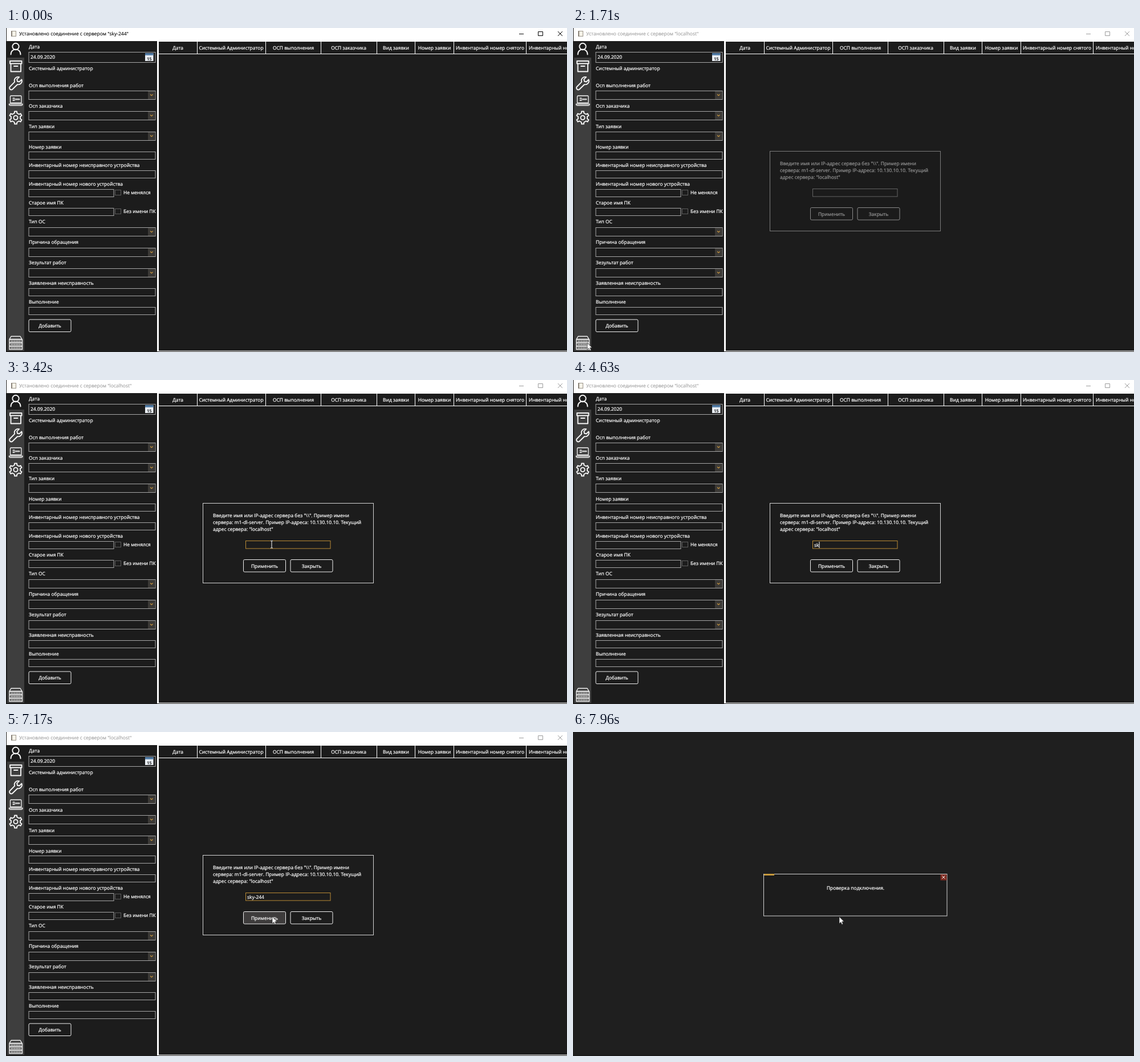
Animation, 984 px wide and 569 px high, one loop 8000 ms. Source, as an HTML page:

```html
<!DOCTYPE html>
<html lang="ru">
<head>
<meta charset="utf-8">
<title>Соединение с сервером</title>
<style>
html, body { margin: 0; width: 100%; height: 100%; overflow: hidden; background: #1f1f1f; }
svg { display: block; }
text {
  font: 8.45px "Open Sans", "Noto Sans", sans-serif;
  fill: #fff; stroke: #fff; stroke-width: .22px; text-rendering: geometricPrecision; white-space: pre;
}
.mid { text-anchor: middle; }
.line { fill: none; stroke: #fff; }
.field { fill: #1c1c1c; stroke: #a6a6a6; }
.icon { fill: none; stroke: #f5f5f5; stroke-width: 1.9; stroke-linejoin: round; stroke-linecap: round; }
.title text { fill: currentColor; stroke: currentColor; stroke-width: .12px; }
.title path { fill: none; stroke: currentColor; }
.off { fill: #f1f1f1; stroke: #f1f1f1; }
.dim { fill: #999; stroke: #999; stroke-width: .12px; }
.day { font-size: 7.5px; font-weight: 700; fill: #333; stroke: none; }

/* One loop is 8 s, so 1% is 80 ms */
.step { animation: 8s step-end infinite; }
.flow { animation: 8s linear infinite; }

.title { animation-name: active; }
@keyframes active { 0% { color: #000; } 19.75%, 100% { color: #9c9c9c; } }
.before { animation-name: before; }
@keyframes before { 0% { opacity: 1; } .5%, 100% { opacity: 0; } }
.after { animation-name: after; }
@keyframes after { 0% { opacity: 0; } .5%, 100% { opacity: 1; } }

.ask { animation-name: ask; }
@keyframes ask { 0%, 19.75% { opacity: 0; } 22.875%, 91.24% { opacity: 1; } 91.25%, 100% { opacity: 0; } }
.focus { animation-name: focus; }
@keyframes focus { 0% { stroke: #a6a6a6; } 28.75%, 100% { stroke: #b98a35; } }
.hover { animation-name: hover; }
@keyframes hover { 0% { fill: #1c1c1c; } 88.25%, 100% { fill: #3e3c3c; } }

.typed { animation-name: typed; }
@keyframes typed {
  0% { width: 0; } 47.875% { width: 4.1px; } 57.875% { width: 8.5px; } 61.5% { width: 12.7px; }
  67.25% { width: 15.5px; } 71.875% { width: 20.3px; } 75.5% { width: 25.1px; } 77.125%, 100% { width: 40px; }
}
.caret { animation-name: caretMove, caretBlink; }
@keyframes caretMove {
  0% { transform: none; } 47.875% { transform: translateX(4px); } 57.875% { transform: translateX(8.5px); }
  61.5% { transform: translateX(12.5px); } 67.25% { transform: translateX(15.5px); }
  71.875% { transform: translateX(20px); } 75.5% { transform: translateX(25px); }
  77.125%, 100% { transform: translateX(30px); }
}
@keyframes caretBlink {
  0% { opacity: 0; } 34.875% { opacity: 1; } 42.25% { opacity: 0; } 47.875% { opacity: 1; }
  54.5% { opacity: 0; } 57.875% { opacity: 1; } 84.875%, 100% { opacity: 0; }
}

.check { animation-name: check; }
@keyframes check { 0% { opacity: 0; } 91.25% { opacity: 1; } 93.75%, 100% { opacity: 0; } }
.ring { transform-box: fill-box; transform-origin: center; animation: spin 1s linear infinite; }
@keyframes spin { to { transform: rotate(360deg); } }

.dark { animation-name: dark; }
@keyframes dark { 0% { opacity: 0; } 93.75%, 100% { opacity: 1; } }
.test { animation-name: test; }
@keyframes test { 0%, 96.5% { opacity: 0; } 98.5%, 100% { opacity: 1; } }
.bar { animation-name: bar; }
@keyframes bar { 0%, 96.875% { width: 0; } 99.5%, 100% { width: 18px; } }

.pointer { animation-name: pointer; }
@keyframes pointer {
  0%, .5% { transform: translate(900px, 490px); animation-timing-function: cubic-bezier(.3, .2, .4, 1); }
  10.375%, 25% { transform: translate(25px, 553px); animation-timing-function: ease-in-out; }
  29.75%, 84.875% { transform: translate(466px, 289px); animation-timing-function: ease-in-out; }
  89.125%, 100% { transform: translate(467px, 324.5px); }
}
.arrow { animation-name: arrow; }
@keyframes arrow { 0% { opacity: 0; } .5% { opacity: 1; } 29% { opacity: 0; } 86.75%, 100% { opacity: 1; } }
.beam { animation-name: beam; }
@keyframes beam { 0% { opacity: 0; } 29% { opacity: 1; } 47.875% { opacity: 0; } 84.875% { opacity: 1; } 86.75%, 100% { opacity: 0; } }
</style>
</head>
<body>
<svg id="stage" width="984" height="569"></svg>
<script>
const rect = (x, y, w, h, attrs = '') => `<rect x="${x}" y="${y}" width="${w}" height="${h}" ${attrs}/>`;
const path = (d, attrs = '') => `<path d="${d}" ${attrs}/>`;
const text = (x, y, s, cls = '') => `<text x="${x}" y="${y}" class="${cls}">${s}</text>`;
const group = (cls, ...parts) => `<g class="${cls}">${parts.join('')}</g>`;
const field = (y, h, w = 222) => rect(40, y + .5, w, h, 'class="field"');
const combo = y => field(y, 15) + rect(249, y + 1, 12.5, 14, 'fill="#3b3936"')
  + path(`M253 ${y + 6.5}l2.3 2.2 2.3-2.2`, 'fill="none" stroke="#c9973f" stroke-width="1.1"');
const button = (x, y, label, cls = '') =>
  rect(x + .5, y + .5, 74, 21.5, `rx="2" fill="#1c1c1c" stroke="#f0f0f0" class="${cls}"`)
  + text(x + 37.5, y + 14.5, label, 'mid');

function titleBar() {
  const connected = 'Установлено соединение с сервером ';
  return rect(1, 0, 983, 23, 'fill="#fff"')
    + rect(10.5, 5.5, 7, 9, 'fill="#f5f2e8" stroke="#9b958a"') + rect(9, 5, 1.5, 10, 'fill="#857f75"')
    + group('title step',
      text(23, 13, connected + '"sky-244"', 'before step'),
      text(23, 13, connected + '"localhost"', 'after step'),
      path('M900 10.5h8M933.5 6.5h8v7h-8zM968 6l8 8M976 6l-8 8'));
}

function gearPath(x, y, teeth) {
  const points = [];
  for (let i = 0; i < teeth; i++)
    for (const [shift, r] of [[-.27, 8.3], [-.17, 11.2], [.17, 11.2], [.27, 8.3]]) {
      const a = (i + shift) * 2 * Math.PI / teeth;
      points.push(`${(x + r * Math.sin(a)).toFixed(2)} ${(y - r * Math.cos(a)).toFixed(2)}`);
    }
  return `M${points.join('L')}z`;
}

function sideBar() {
  const rows = [547, 553, 559];
  const rack = 'M9 541.5h16l3 5H6z' + rows.map(y => `M6 ${y}h22.5v5.5h-22.5z`).join('');
  const dots = rows.map(y => `M8.5 ${y + 2.8}h18`).join('');
  return rect(2, 23, 30, 29, 'fill="#1c1c1c"') + rect(2, 52, 30, 515, 'fill="#3e3e3e"')
    + group('icon',
      '<circle cx="17" cy="32.5" r="5.7"/>', path('M8.5 46.5c0-12 17-12 17 0'),
      path('M7 58h20.5v4.5H7zM8.5 62.5v14H26v-14M14 67h6.5'),
      path('M27.5 90.5l-4 4-3.5-.8-.8-3.5 4-4a6.5 6.5 0 0 0-8 8.5L7 103a3 3 0 0 0 4.5 4.5l8.5-8.3a6.5 6.5 0 0 0 7.5-8.7z'),
      path('M7.5 131.5v-11q0-1.5 1.5-1.5h16.5q1.5 0 1.5 1.5v11zM5.5 133.5h23.5v1q0 1.5-2 1.5H7.5q-2 0-2-1.5z', 'stroke-width="1.3"'),
      path('M23.5 124.6h-7.3a2.7 2.7 0 0 0-4.6-.8h2.6v2.9h-2.6a2.7 2.7 0 0 0 4.6-.8h7.3z', 'stroke-width="1"'),
      path(gearPath(17, 157.5, 6)), '<circle cx="17" cy="157.5" r="3.6"/>',
      path(rack, 'stroke-width="1.4"'),
      path(dots, 'stroke-width="2.2" stroke-dasharray="1.6 1.2" stroke-linecap="butt"'));
}

function form() {
  const labels = [
    [33, 'Дата'], [71, 'Системный администратор'], [101, 'Осп выполнения работ'], [137, 'Осп заказчика'],
    [173, 'Тип заявки'], [208.5, 'Номер заявки'], [241, 'Инвентарный номер неисправного устройства'],
    [274, 'Инвентарный номер нового устройства'], [307, 'Старое имя ПК'], [340, 'Тип ОС'],
    [376, 'Причина обращения'], [412, 'Зезультат работ'], [448, 'Заявленная неисправность'], [481, 'Выполнение']
  ];
  const option = (y, label) => rect(191.5, y + .5, 10, 9, 'fill="#1c1c1c" stroke="#5c5c5c"') + text(206, y + 8, label);
  return labels.map(([y, s]) => text(40, y + 3, s)).join('')
    + field(42, 18) + text(43, 53.8, '24.09.2020')
    + rect(244, 44, 14.5, 14, 'fill="#e9eef4"') + rect(244, 44, 14.5, 4, 'fill="#557fa8"')
    + text(251.3, 56.5, '15', 'mid day')
    + [110, 146, 182, 350, 386, 422].map(combo).join('')
    + [217, 250, 457, 490].map(y => field(y, 13)).join('')
    + [283, 316].map(y => field(y, 13, 149)).join('')
    + option(284, 'Не менялся') + option(317, 'Без имени ПК')
    + button(39.5, 511.5, 'Добавить');
}

function table() {
  const heads = [
    [301.5, 'Дата'], [395, 'Системный Администратор'], [504, 'ОСП выполнения'], [601, 'ОСП заказчика'],
    [684, 'Вид заявки'], [751.5, 'Номер заявки'], [849, 'Инвентарный номер снятого']
  ];
  const edges = [335, 455, 552, 650, 717, 785, 912].map(x => `M${x + .5} 24v21`).join('');
  return rect(265, 23, 3, 545, 'fill="#fff"') + rect(268, 566.8, 716, 1.2, 'fill="#fff"')
    + path('M268 23.5h716M268 45.5h716' + edges, 'class="line"')
    + heads.map(([x, s]) => text(x, 38, s, 'mid')).join('')
    + text(917, 38, 'Инвентарный номер нового');
}

const askDialog = group('ask flow',
  rect(345.5, 216.5, 299, 140, 'fill="#1c1c1c" stroke="#d4d4d4"'),
  text(363, 241, 'Введите имя или IP-адрес сервера без "\\\\". Пример имени'),
  text(363, 253.2, 'сервера: m1-dl-server. Пример IP-адреса: 10.130.10.10. Текущий'),
  text(363, 265.3, 'адрес сервера: "localhost"'),
  rect(420.5, 282.5, 148.5, 13.5, 'fill="#1c1c1c" class="focus step"'),
  `<clipPath id="entry">${rect(423, 280, 0, 20, 'class="typed step"')}</clipPath>`,
  `<g clip-path="url(#entry)">${text(423, 292.7, 'sky-244')}</g>`,
  rect(423, 284, 1, 11, 'fill="#fff" class="caret step"'),
  button(416, 315, 'Применить', 'hover step'), button(498.5, 315, 'Закрыть'));

const offButton = (x, label) => rect(x, 292, 73.5, 21, 'rx="1.5" fill="#bdbdbd"')
  + text(x + 36.7, 305.7, label, 'mid off');
const checkDialog = group('check step',
  rect(345.5, 216.5, 299, 116, 'fill="#1c1c1c" stroke="#d4d4d4"'),
  text(495, 241.3, 'Проверка введенных данных. Подождите.', 'mid'),
  rect(420.5, 258.5, 148.5, 13.5, 'fill="#1c1c1c" stroke="#777"'),
  text(423, 268.7, 'sky-244', 'dim'),
  offButton(417, 'Применить'), offButton(499.5, 'Закрыть'),
  '<g class="ring" fill="none" stroke-width="2.2"><circle cx="477" cy="324.3" r="4.8" stroke="#2c6fb0"/>',
  '<circle cx="477" cy="324.3" r="4.8" stroke="#5eb2f2" stroke-dasharray="14 17"/></g>');

const darkScreen = group('dark step',
  rect(0, 0, 984, 569, 'fill="#1f1f1f"'), rect(0, 567.5, 984, 1.5, 'fill="#191919"'),
  group('test flow',
    rect(334.5, 249.5, 321.5, 73.5, 'fill="#1c1c1c" stroke="#d4d4d4"'),
    rect(335, 249, 0, 3, 'fill="#c89a3c" class="bar flow"'),
    rect(644.5, 250, 11, 10.5, 'fill="#7d2a20"'),
    path('M647.3 252.5l5.2 5.2M652.5 252.5l-5.2 5.2', 'class="line"'),
    text(495.5, 276.5, 'Проверка подключения.', 'mid')));

const pointer = group('pointer flow',
  path('M0 0V12L2.8 9.4 4.6 13.5 6.6 12.6 4.8 8.6H8.6Z', 'fill="#fff" stroke="#111" stroke-width=".6" class="arrow step"'),
  path('M-2 -6.5h1.5l.5 .5 .5-.5h1.5M0 -6v11.5M-2 6h1.5l.5-.5 .5.5h1.5', 'class="line beam step"'));

document.getElementById('stage').innerHTML =
  rect(0, 0, 984, 569, 'fill="#1f1f1f"') + rect(1, 23, 983, 545, 'fill="#1c1c1c"')
  + titleBar() + sideBar() + form() + table()
  + askDialog + checkDialog + darkScreen + pointer;
</script>
</body>
</html>
```
